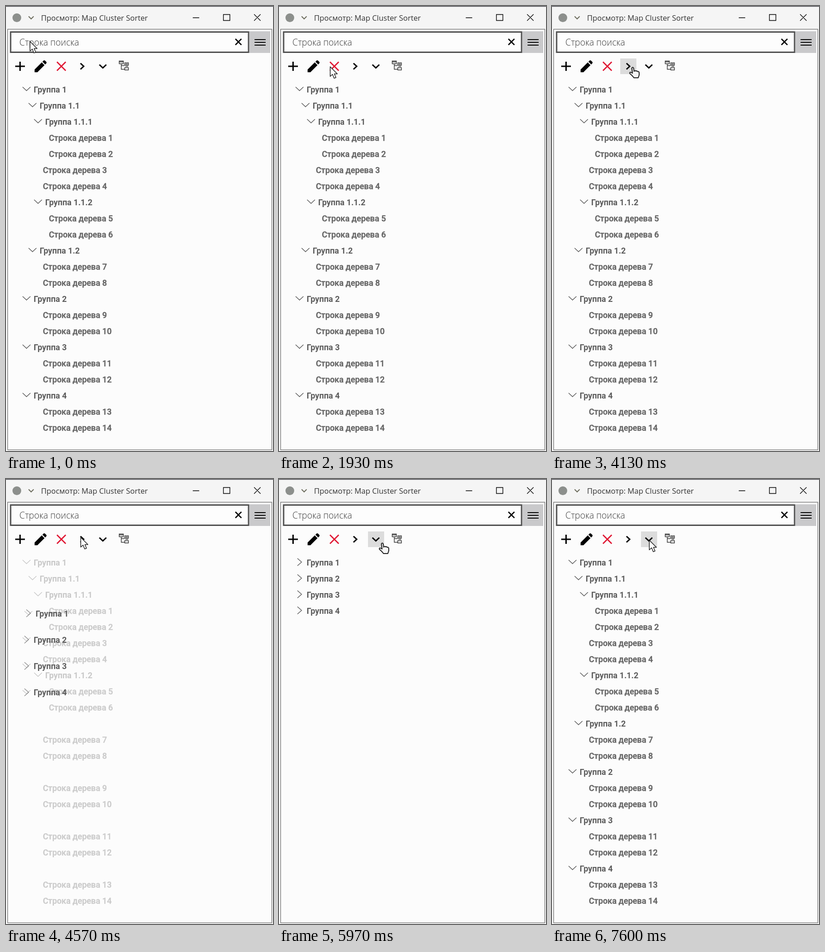
Animation, 579 px wide and 967 px high, one loop 8 s. Source, as an HTML page:

```html
<!DOCTYPE html>
<html lang="ru">
<head>
<meta charset="utf-8">
<style>
  html, body { margin: 0; width: 100%; height: 100%; overflow: hidden; background: #fcfcfc; }
  svg { display: block; width: 579px; height: 967px; }
  .line { fill: none; stroke: #000; }
  .title { font: 16.4px "Open Sans", sans-serif; fill: #333; }
  .search { font: 300 19.2px "Open Sans", sans-serif; fill: #383838; }
  .row text { font: 500 17.8px Roboto, sans-serif; fill: #646464; stroke: #646464; stroke-width: .45; }
  .row .group { font-weight: 700; fill: #5c5c5c; stroke: none; }
  .row path { fill: none; stroke: #555; stroke-width: 1.3; }
</style>
</head>
<body>
<svg id="stage" viewBox="0 0 579 967">
  <rect width="579" height="967" fill="#fcfcfc"/>
  <rect width="579" height="50" fill="#f5f5f5"/>
  <rect width="579" height="1.5" fill="#4a4a50"/>
  <rect x="3.5" y="50.5" width="573" height="914" fill="#fcfcfc" stroke="#777" stroke-width="1.4"/>

  <circle cx="23.5" cy="25.5" r="9.5" fill="#8c8f8c"/>
  <path class="line" d="M49 22.5l5.5 5.5 5.5-5.5" style="stroke:#6b6b5c;stroke-width:2"/>
  <text class="title" x="76" y="31.5">Просмотр: Map Cluster Sorter</text>
  <path class="line" d="M405 25.5h14M471.5 18.5h14v13h-14zM538 18l14 14M552 18l-14 14" stroke-width="1.4"/>

  <rect x="10" y="56.5" width="516" height="44" fill="#fdfdfd" stroke="#505050" stroke-width="3"/>
  <text class="search" x="29" y="85.5">Строка поиска</text>
  <path class="line" d="M497.5 71.5l13 13M510.5 71.5l-13 13" stroke-width="2.6"/>
  <rect x="528" y="55" width="45" height="47" fill="#c9c9cb"/>
  <path class="line" d="M539 73h24M539 79h24M539 85h24" stroke-width="2"/>

  <rect id="hoverCollapse" x="148" y="114" width="35" height="34" fill="#dcdcdc"/>
  <rect id="hoverExpand" x="193" y="114" width="35" height="34" fill="#dcdcdc"/>
  <path class="line" d="M20 131h21M30.5 121v20" stroke-width="3"/>
  <path d="M62 144v-6l15.5-15.5 6 6L68 144zM79 121l2.5-2.5q1.5-1 3 0l3 3q1 1.5 0 3l-2.5 2.5z"/>
  <path class="line" d="M110.5 121.5l19 19M129.5 121.5l-19 19" style="stroke:#e01632;stroke-width:2.7"/>
  <path class="line" d="M161.5 124.5l7 6.5-7 6.5M202.5 127.5l7.5 7 7.5-7" stroke-width="3"/>
  <path class="line" d="M245.5 119.5h9v6h-9zM245 121.5h9M250 126v11.5h7M250 129.5h7M257.5 123.5h8v5h-8zM257.5 134h8v5h-8zM259 126h5M259 131h6" style="stroke:#333;stroke-width:1.4"/>

  <g id="tree"></g>
  <g id="cursor" stroke="#222" stroke-width="1.5" stroke-linejoin="round" fill="#fff">
    <path id="arrow" d="M0 0V21L5 16.5 8.5 25 12.5 23.5 9 15.5H15.5Z"/>
    <path id="hand" stroke-width="2" fill="#f5f5f5" d="M-2 2Q0-1.5 2 2L3 9Q5 6.5 7 8.5 9 7 10.5 9.5 13.5 8.5 14 12V17Q13 20 12 23H2.5Q0 19-6 14-7.5 10.5-4 11L-.5 13Z"/>
  </g>
</svg>
<script>
const LOOP = 8000, TOP = 181, PITCH = 35;
const $ = id => document.getElementById(id);

// Each entry: label, text x, whether it has a chevron.
const group = (name, x) => ({ label: 'Группа ' + name, x, chevron: true });
const leaf = (n, x = 80) => ({ label: 'Строка дерева ' + n, x });
const items = [
  group('1', 60), group('1.1', 73), group('1.1.1', 85), leaf(1, 93), leaf(2, 93), leaf(3), leaf(4),
  group('1.1.2', 85), leaf(5, 93), leaf(6, 93), group('1.2', 73), leaf(7), leaf(8),
  group('2', 60), leaf(9), leaf(10), group('3', 60), leaf(11), leaf(12), group('4', 60), leaf(13), leaf(14)
];
const NESTED_LAST = 10;

function add(parent, tag, attrs = {}) {
  const node = document.createElementNS('http://www.w3.org/2000/svg', tag);
  for (const key in attrs) node.setAttribute(key, attrs[key]);
  return parent.appendChild(node);
}

function makeRow({ label, x, chevron }, foldable) {
  const node = add($('tree'), 'g', { class: 'row' });
  add(node, 'text', { x, y: 6.5, class: chevron ? 'group' : 'leaf' }).textContent = label;
  const open = chevron && add(node, 'path', { d: `M${x - 24} -5l8.5 8 8.5 -8` });
  const closed = foldable && add(node, 'path', { d: `M${x - 20} -8.5l9 8 -9 8` });
  return { node, open, closed };
}

const isRoot = item => item.x === 60;
const rows = items.map((item, i) => ({ ...makeRow(item), y: TOP + PITCH * i, root: isRoot(item) }));
const roots = rows.flatMap((row, i) => row.root ? [{ ...makeRow(items[i], true), openY: row.y }] : []);

const clamp = v => Math.max(0, Math.min(1, v));
const mix = (a, b, p) => a + (b - a) * p;
const ease = v => v < .5 ? 2 * v * v : 1 - 2 * (1 - v) ** 2;
const span = (t, from, to) => ease(clamp((t - from) / (to - from)));
const within = (t, from, to) => t >= from && t < to;

// Pointer stops: time, x, y.
const stops = [
  [0, 52, 77], [30, 52, 77], [570, 40, 140], [800, 40, 140], [1400, 97, 146], [1800, 97, 146],
  [1930, 111, 132], [2170, 130, 150], [2430, 130, 150], [3230, 174, 144], [3270, 174, 144],
  [4070, 175, 133], [4150, 175, 133], [4600, 162, 127], [4930, 162, 127], [5730, 190, 150],
  [5770, 190, 150], [5970, 224, 139], [6270, 229, 152], [6570, 229, 152], [6770, 211, 133], [LOOP, 211, 133]
];

function drawPointer(t) {
  const i = stops.findIndex(stop => stop[0] > t);
  const [t0, x0, y0] = stops[i - 1], [t1, x1, y1] = stops[i];
  const p = span(t, t0, t1);
  $('cursor').setAttribute('transform', `translate(${mix(x0, x1, p)} ${mix(y0, y1, p)})`);

  const onCollapse = within(t, 3700, 4250), onExpand = within(t, 5860, 6100);
  const pointing = onCollapse || onExpand;
  $('hand').style.opacity = +pointing;
  $('arrow').style.opacity = +!pointing;
  $('hoverCollapse').style.opacity = +onCollapse;
  $('hoverExpand').style.opacity = onExpand ? 1 : span(t, 7200, 7600);
}

function drawTree(t) {
  const collapsing = t < 7000;
  const opened = collapsing ? 1 - span(t, 4150, 4850) : span(t, 7010, 7600);
  const moving = opened > 0 && opened < 1;

  rows.forEach(({ node, y, root }, i) => {
    // The first root travels from the last nested group while the tree closes.
    const travels = collapsing ? i === NESTED_LAST : i === 0;
    const replaced = moving && (travels || root && i > 0);
    node.setAttribute('transform', `translate(0 ${y})`);
    node.style.opacity = replaced ? 0 : opened;
  });

  roots.forEach(({ node, open, closed, openY }, k) => {
    const fromNested = collapsing && k === 0;
    const startY = fromNested ? rows[NESTED_LAST].y : openY;
    const dx = fromNested ? 13 * opened : 0;
    node.setAttribute('transform', `translate(${dx} ${mix(TOP + PITCH * k, startY, opened)})`);
    node.style.opacity = opened < 1 ? 1 : 0;
    open.style.opacity = opened;
    closed.style.opacity = 1 - opened;
  });
}

function frame() {
  const t = performance.now() % LOOP;
  drawPointer(t);
  drawTree(t);
  requestAnimationFrame(frame);
}
frame();
</script>
</body>
</html>
```
